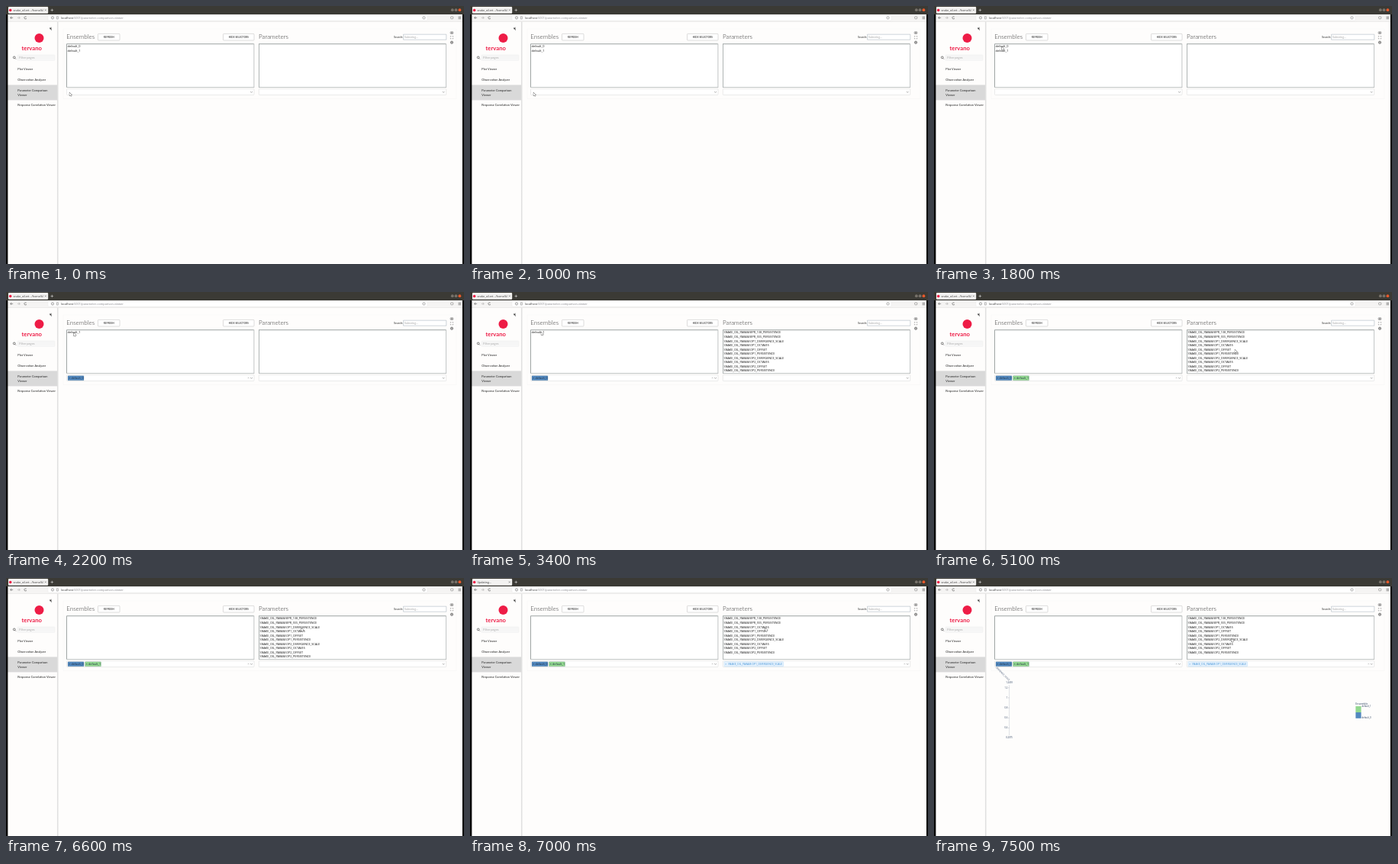
Recreate the animation shown at these times as an HTML page with a canvas. Size 600 px wide and 338 px high, loop 8000 ms.

```html
<!DOCTYPE html>
<html lang="en">
<head>
<meta charset="utf-8">
<title>Parameter comparison</title>
<style>
  html, body { margin: 0; width: 100%; height: 100%; overflow: hidden; background: #fefdfc; }
  canvas { display: block; width: 600px; height: 338px; }
</style>
</head>
<body>
<canvas id="stage"></canvas>
<script>
const LOOP = 8000, STEP = 100;
const canvas = document.getElementById('stage');
const ctx = canvas.getContext('2d');
const dpr = window.devicePixelRatio || 1;
canvas.width = 600 * dpr;
canvas.height = 338 * dpr;

const UI = 'Lato, sans-serif';
const SYS = '"Open Sans", sans-serif';
const RED = '#ee1c46', BLUE = '#5288bf', GREEN = '#92d88f', INK = '#333', PAGE = '#fefdfc';
const PREFIX = 'SNAKE_OIL_PARAM:';
const PICKED = 'OP1_DIVERGENCE_SCALE';
const PARAMS = ['BPR_138_PERSISTENCE', 'BPR_555_PERSISTENCE'];
for (const op of ['OP1', 'OP2'])
  for (const key of ['DIVERGENCE_SCALE', 'OCTAVES', 'OFFSET', 'PERSISTENCE'])
    PARAMS.push(op + '_' + key);

// Pointer path: time, x, y
const PATH = [
  [0, 83, 113], [1100, 83, 113], [1800, 88.5, 53], [2600, 88.5, 53],
  [2800, 92.5, 52], [3200, 92.5, 52], [3400, 93, 51.8], [4200, 93, 51.8],
  [4400, 118.5, 59.5], [4700, 325, 61], [4800, 348, 64], [5100, 394, 75],
  [5900, 394, 75], [6300, 391, 61], [6600, 386.5, 65], [7100, 386.5, 65],
  [7500, 389.3, 79], [LOOP, 389.3, 79]
];

function pointerAt(t) {
  const i = Math.max(1, PATH.findIndex(p => p[0] >= t));
  const [t0, x0, y0] = PATH[i - 1], [t1, x1, y1] = PATH[i];
  const k = (t - t0) / (t1 - t0);
  return [x0 + (x1 - x0) * k, y0 + (y1 - y0) * k];
}

// Text centred vertically on y; set large and scaled down for even spacing.
function text(str, x, y, size, { font = UI, color = INK, weight = 400, align = 'left', gap = 0 } = {}) {
  ctx.save();
  ctx.translate(x, y + size * 0.35);
  ctx.scale(0.1, 0.1);
  ctx.font = `${weight} ${size * 10}px ${font}`;
  ctx.letterSpacing = gap * 10 + 'px';
  ctx.textAlign = align;
  ctx.fillStyle = color;
  ctx.fillText(str, 0, 0);
  ctx.restore();
}

function rect(x, y, w, h, color) {
  ctx.fillStyle = color;
  ctx.fillRect(x, y, w, h);
}

function box(x, y, w, h, stroke, fill, r = 0, line = 0.5) {
  ctx.beginPath();
  ctx.roundRect(x, y, w, h, r);
  if (fill) { ctx.fillStyle = fill; ctx.fill(); }
  if (stroke) { ctx.strokeStyle = stroke; ctx.lineWidth = line; ctx.stroke(); }
}

function dot(x, y, r, color) {
  ctx.fillStyle = color;
  ctx.beginPath();
  ctx.arc(x, y, r, 0, 7);
  ctx.fill();
}

function ring(x, y, r, color, from = 0, to = 7, line = 0.6) {
  ctx.strokeStyle = color;
  ctx.lineWidth = line;
  ctx.beginPath();
  ctx.arc(x, y, r, from, to);
  ctx.stroke();
}

function lines(color, width, ...paths) {
  ctx.strokeStyle = color;
  ctx.lineWidth = width;
  ctx.beginPath();
  for (const p of paths)
    for (let i = 0; i < p.length; i += 2)
      i ? ctx.lineTo(p[i], p[i + 1]) : ctx.moveTo(p[i], p[i + 1]);
  ctx.stroke();
}

function cross(x, y, r, color) {
  lines(color, 0.5, [x - r, y - r, x + r, y + r], [x - r, y + r, x + r, y - r]);
}

function browser(updating) {
  rect(0, 0, 600, 11, '#3b3a35');
  box(3, 1.1, 52.2, 8.7, null, '#f3f2f1', 1);
  dot(5.7, 5.5, 1.8, RED);
  text(updating ? 'Updating...' : 'snake_oil.ert - /home/kl', 9.5, 5.4, 3.6, { font: SYS, color: '#333' });
  cross(51.8, 5.4, 1, '#555');
  lines('#ddd', 0.6, [58.5, 5.4, 62.1, 5.4], [60.3, 3.6, 60.3, 7.2]);
  dot(584.8, 5.2, 1.9, '#77726a');
  dot(589.5, 5.2, 1.9, '#77726a');
  dot(594.4, 5.2, 1.9, '#e9592b');

  rect(2, 11, 596, 9.4, '#f5f4f3');
  rect(2, 20, 596, 0.5, '#dcdbda');
  box(55, 11.9, 497, 7.2, '#e4e3e2', '#fff', 1.2, 0.4);
  lines('#555', 0.6, [9.2, 15.4, 5.8, 15.4], [7.3, 13.8, 5.7, 15.4, 7.3, 17]);
  lines('#aaa', 0.6, [14.8, 15.4, 18.2, 15.4], [16.7, 13.8, 18.3, 15.4, 16.7, 17]);
  ring(25.5, 15.4, 1.6, '#555', 0.4, 5.6);
  ring(61, 15.4, 1.6, '#666');
  box(66.4, 13.8, 2, 3.2, '#777');
  text('localhost', 72, 15.4, 3.85, { font: SYS, color: '#333' });
  text(':5001/parameter-comparison-viewer', 88.1, 15.4, 3.85, { font: SYS, color: '#85858a' });
  ring(547.5, 15.4, 1.6, '#777');
  box(582.6, 13.8, 3.2, 3, '#666', null, 1);
  lines('#666', 0.6, [592.5, 14, 596, 14], [592.5, 15.4, 596, 15.4], [592.5, 16.8, 596, 16.8]);
}

function sidebar() {
  const shade = ctx.createLinearGradient(66.8, 0, 69.5, 0);
  shade.addColorStop(0, '#d6d6d6');
  shade.addColorStop(1, PAGE);
  rect(66.8, 20.5, 2.7, 318, shade);
  rect(2, 20.5, 64.8, 318, PAGE);
  lines('#333', 1.1, [57.4, 28.6, 59.4, 30.2]);
  lines('#333', 0.6, [57, 30.2, 59.8, 28], [58.6, 29.6, 59.6, 31.8]);
  dot(43.5, 42, 6, RED);
  text('tervano', 20.5, 55.3, 7.7, { color: RED, weight: 700 });
  box(15, 64, 49, 7.4, '#efefef', '#f6f6f6', 0.6);
  ring(10.8, 67.4, 1.4, '#444', 0, 7, 0.7);
  lines('#444', 0.7, [11.8, 68.4, 13, 69.6]);
  text('Filter pages', 17.2, 67.7, 4, { color: '#aaa' });
  rect(2, 103.4, 65, 20, '#d9d9d9');
  const items = [['Plot Viewer', 82.7], ['Observation Analyzer', 96.5], ['Parameter Comparison', 110.2],
    ['Viewer', 116.3], ['Response Correlation Viewer', 130]];
  for (const [label, y] of items) text(label, 15.3, y, 3.9, { color: '#222' });
}

function button(label, x, w) {
  box(x, 36.4, w, 8.6, '#bbb', '#fff', 0.8);
  text(label, x + w / 2 + 0.2, 40.7, 2.7, { color: '#333', weight: 700, align: 'center', gap: 0.32 });
}

function selector(x, filled) {
  rect(x, 49.5, 246, 57.5, '#b6baba');
  rect(x, 49.5, 245.3, 56.8, '#8d9595');
  rect(x + 0.7, 50.2, 244.6, 56.1, '#fff');
  box(x + 0.3, 108.4, 245.4, 8.2, '#d6d6d6', '#fff', 0.8);
  lines('#777', 0.6, [x + 240.8, 112, x + 242.2, 113.4, x + 243.6, 112]);
  if (filled) cross(x + 238.3, 112.5, 0.8, '#aaa');
}

function chip(label, x, color) {
  box(x, 109.8, 21, 6, 'rgba(40,70,90,.4)', color, 0.6, 0.4);
  cross(x + 2.2, 112.8, 0.7, '#2b4256');
  text(label, x + 4.6, 112.7, 3.7, { font: SYS, color: '#1d2f42' });
}

function toolIcons() {
  box(582.2, 33.8, 3.6, 2.6, '#555', null, 0.4);
  ring(584, 35.1, 0.7, '#555');
  for (const sx of [-1, 1]) for (const sy of [-1, 1])
    lines('#666', 0.5, [584 + sx * 0.7, 41.2 + sy * 1.7, 584 + sx * 1.7, 41.2 + sy * 1.7, 584 + sx * 1.7, 41.2 + sy * 0.7]);
  ring(584, 47.7, 1.6, '#555', 0, 7, 0.8);
  dot(584, 47.7, 0.7, '#555');
}

function plot() {
  const ink = { font: SYS, color: '#2a3f5f' };
  ctx.save();
  ctx.beginPath();
  ctx.rect(79, 117, 500, 100);
  ctx.clip();
  ctx.translate(98.8, 134);
  ctx.rotate(Math.PI / 4);
  text(PREFIX + PICKED, 0, 0, 2.9, { ...ink, align: 'right' });
  ctx.restore();

  lines('#c2c7d0', 0.5, [98.6, 140.2, 98.6, 206]);
  text('1.2493', 98.5, 137.2, 2.8, { ...ink, align: 'center' });
  text('0.2075', 98.5, 208.8, 2.8, { ...ink, align: 'center' });
  ['1.2', '1', '0.8', '0.6', '0.4'].forEach((label, i) => {
    const y = 143.8 + i * 13.15;
    lines('#a5abb5', 0.5, [97, y, 98.6, y]);
    text(label, 96.4, y, 2.8, { ...ink, align: 'right' });
  });

  text('Ensemble', 552.3, 164.4, 3.5, ink);
  rect(552.4, 168, 7.2, 8, GREEN);
  rect(552.4, 176, 7.2, 7.8, BLUE);
  text('default_1', 560.5, 168, 2.8, ink);
  text('default_0', 560.5, 183.5, 2.8, ink);
}

function pointer(x, y) {
  ctx.save();
  ctx.translate(x + 0.3, y + 0.4);
  ctx.beginPath();
  [[0, 0], [0, 4.2], [1, 3.4], [1.7, 4.8], [2.4, 4.5], [1.8, 3.1], [3, 3]].forEach(p => ctx.lineTo(...p));
  ctx.closePath();
  ctx.lineJoin = 'round';
  ctx.strokeStyle = '#333';
  ctx.lineWidth = 0.7;
  ctx.stroke();
  ctx.fillStyle = '#fff';
  ctx.fill();
  ctx.restore();
}

function content(t) {
  const first = t >= 2100, second = t >= 4100;
  const listed = t >= 2400, picked = t >= 7000;

  box(75, 30, 515, 91.5, '#f5f5f4', PAGE);
  text('Ensembles', 79.2, 40.4, 8.05, { weight: 300 });
  text('Parameters', 331, 40.4, 8.05, { weight: 300 });
  button('REFRESH', 120.5, 28.5);
  button('HIDE SELECTORS', 284.5, 40.5);
  text('Search:', 508, 40.8, 3.8);
  box(520.6, 37.2, 56.2, 7, '#9faab5', '#fff');
  text('Substring...', 522, 40.8, 3.65, { color: '#a5a5a5' });
  toolIcons();

  selector(79.3, first);
  selector(331, picked);
  const ensembles = [];
  if (!first) ensembles.push('default_0');
  if (!second) ensembles.push('default_1');
  ensembles.forEach((name, i) => text(name, 80.6, 53.1 + i * 5.56, 3.92, { font: SYS, color: '#111' }));
  if (first) chip('default_0', 81, BLUE);
  if (second) chip('default_1', 103.5, GREEN);

  if (listed) {
    PARAMS.filter(p => !picked || p !== PICKED)
      .forEach((p, i) => text(PREFIX + p, 332.6, 53.1 + i * 5.56, 3.75, { font: SYS, color: '#111' }));
  }
  if (picked) {
    box(333, 109.7, 77.6, 6.2, '#b9dbf7', '#e6f2fd', 0.6);
    cross(335.2, 112.8, 0.7, '#6aaee6');
    text(PREFIX + PICKED, 338, 112.7, 3.4, { font: SYS, color: '#3f92d8' });
  }
  if (t >= 7400) plot();
}

function draw(t) {
  const updating = (t >= 2000 && t < 2200) || (t >= 4000 && t < 4200) || (t >= 6900 && t < 7300);
  ctx.setTransform(dpr, 0, 0, dpr, 0, 0);
  rect(0, 0, 600, 338, PAGE);
  content(t);
  sidebar();
  browser(updating);
  rect(0, 11, 2.4, 327, '#060606');
  rect(597.9, 11, 2.1, 327, '#060606');
  pointer(...pointerAt(t));
}

function tick() {
  const t = performance.now() % LOOP;
  draw(Math.floor(t / STEP) * STEP);
  requestAnimationFrame(tick);
}
tick();
</script>
</body>
</html>
```
